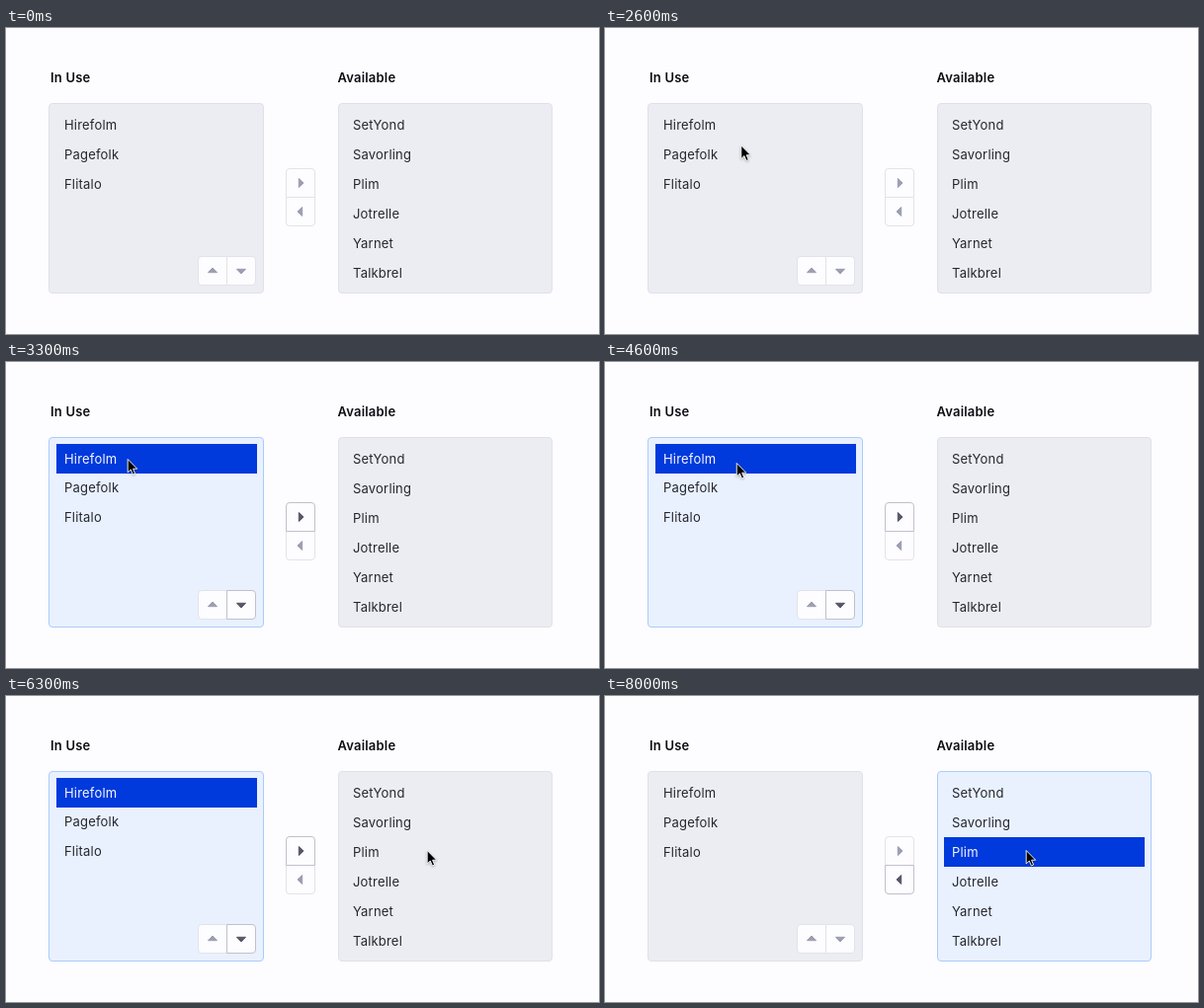
An HTML page for the animation above (8500 ms loop, 600 px wide and 310 px high).

```html
<!DOCTYPE html>
<html lang="en">
<head>
<meta charset="utf-8">
<title>Dual list box</title>
<style>
  html, body { margin: 0; width: 100%; height: 100%; overflow: hidden; background: #fdfcff; }
  #stage { position: relative; width: 600px; height: 310px; overflow: hidden;
    font: 13px/30px Inter, sans-serif; letter-spacing: .2px; color: #25262e; }
  #stage * { position: absolute; box-sizing: border-box; white-space: nowrap; }
  h2 { margin: 0; top: 35px; font: 600 13px/30px Inter, sans-serif; color: #0c0c12; }
  .panel { top: 76px; height: 193px; border: 1px solid #e0e1e8;
    border-radius: 4px; background: #ebedf2; }
  .row { width: 203px; height: 30px; padding-left: 8px; }
  .button { width: 30px; height: 30px; border: 1px solid #e2e3ea; background: #fdfcff; }
  .button svg { left: -1px; top: -1px; }
  .button path { fill: #9c9eb2; stroke: #9c9eb2; stroke-linejoin: round; }
  .left .panel.in, .right .panel.out { background: #e9f1ff; border-color: #abccf8; }
  .left .row.in.pick, .right .row.out.pick { background: #0039dc; color: #f4f7ff; }
  .left .row.in:not(.pick) { margin-top: -1px; }
  .left .button.in, .right .button.out { border-color: #bfc1cc; z-index: 1; }
  .left .button.in path, .right .button.out path { fill: #565869; stroke: #565869; }
  #cursor { left: 0; top: 0; z-index: 2; overflow: visible; filter: drop-shadow(0 1px 1px #0004); }
</style>
</head>
<body>
<div id="stage">
  <svg id="cursor" width="12" height="19">
    <path transform="translate(.7 0) scale(.92)"
      d="M.5 .5V15.2L3.9 12L6.2 17.3L8.6 16.3L6.4 11.1H10.9Z" fill="#000" stroke="#fff"/>
  </svg>
</div>
<script>
const stage = document.getElementById('stage');
const cursor = document.getElementById('cursor');

function add(tag, cls, x, y, html = '') {
  const el = document.createElement(tag);
  el.className = cls;
  el.style.left = x + 'px';
  if (y !== null) el.style.top = y + 'px';
  el.innerHTML = html;
  stage.append(el);
  return el;
}

function list(side, x, width, rowX, title, titleX, names, pick) {
  add('h2', '', titleX, null, title);
  add('div', 'panel ' + side, x, null).style.width = width + 'px';
  names.forEach((name, i) =>
    add('div', `row ${side}${i === pick ? ' pick' : ''}`, rowX, 83 + 30 * i, name));
}

function button(side, x, y, angle, radius) {
  const el = add('div', 'button ' + side, x, y, `<svg width="30" height="30">
    <path transform="rotate(${angle} 15 15)" d="M13.3 10.5L18 15L13.3 19.5Z"/></svg>`);
  el.style.borderRadius = radius;
}

list('in', 43, 218, 51, 'In Use', 45, ['Hirefolm', 'Pagefolk', 'Flitalo'], 0);
list('out', 336, 217, 343, 'Available', 335.5,
  ['SetYond', 'Savorling', 'Plim', 'Jotrelle', 'Yarnet', 'Talkbrel'], 2);
button('in', 283, 142, 0, '4px 4px 0 0');
button('out', 283, 171, 180, '0 0 4px 4px');
button('', 194, 231, -90, '4px 0 0 4px');
button('in', 223, 231, 90, '0 4px 4px 0');

const part = (t, from, to) => Math.min(1, Math.max(0, (t - from) / (to - from)));
const easeOut = p => 1 - (1 - p) ** 2;
const mix = (a, b, p) => a + (b - a) * p;

function cursorAt(t) {
  if (t < 2100) {
    const p = easeOut(part(t, 1700, 1900));
    return [mix(242, 196, p), mix(281, 202, p)];
  }
  if (t < 4400) {
    const p = easeOut(part(t, 2100, 3000));
    return [mix(196, 122, p), mix(202, 98, p)];
  }
  if (t <= 5300) {
    const p = part(t, 4400, 5300) ** 1.68;
    return [mix(122, 248, p), mix(98, 148, p)];
  }
  // keep the speed, dip below the goal and settle on it
  const u = part(t, 5300, 6000);
  const drift = u * (1 - u) ** 2;
  const s = u * u * (3 - 2 * u);
  return [mix(248, 425, s) + 165 * drift,
    mix(148, 156, s) + 65 * drift + 272 * (u * (1 - u)) ** 2];
}

function draw(now) {
  const t = Math.floor(now % 8500 / 100) * 100;
  const [x, y] = cursorAt(t);
  stage.className = t < 3300 ? '' : t < 6400 ? 'left' : 'right';
  cursor.style.display = t < 1700 ? 'none' : '';
  cursor.style.transform = `translate(${x}px, ${y}px)`;
  requestAnimationFrame(draw);
}
requestAnimationFrame(draw);
</script>
</body>
</html>
```
